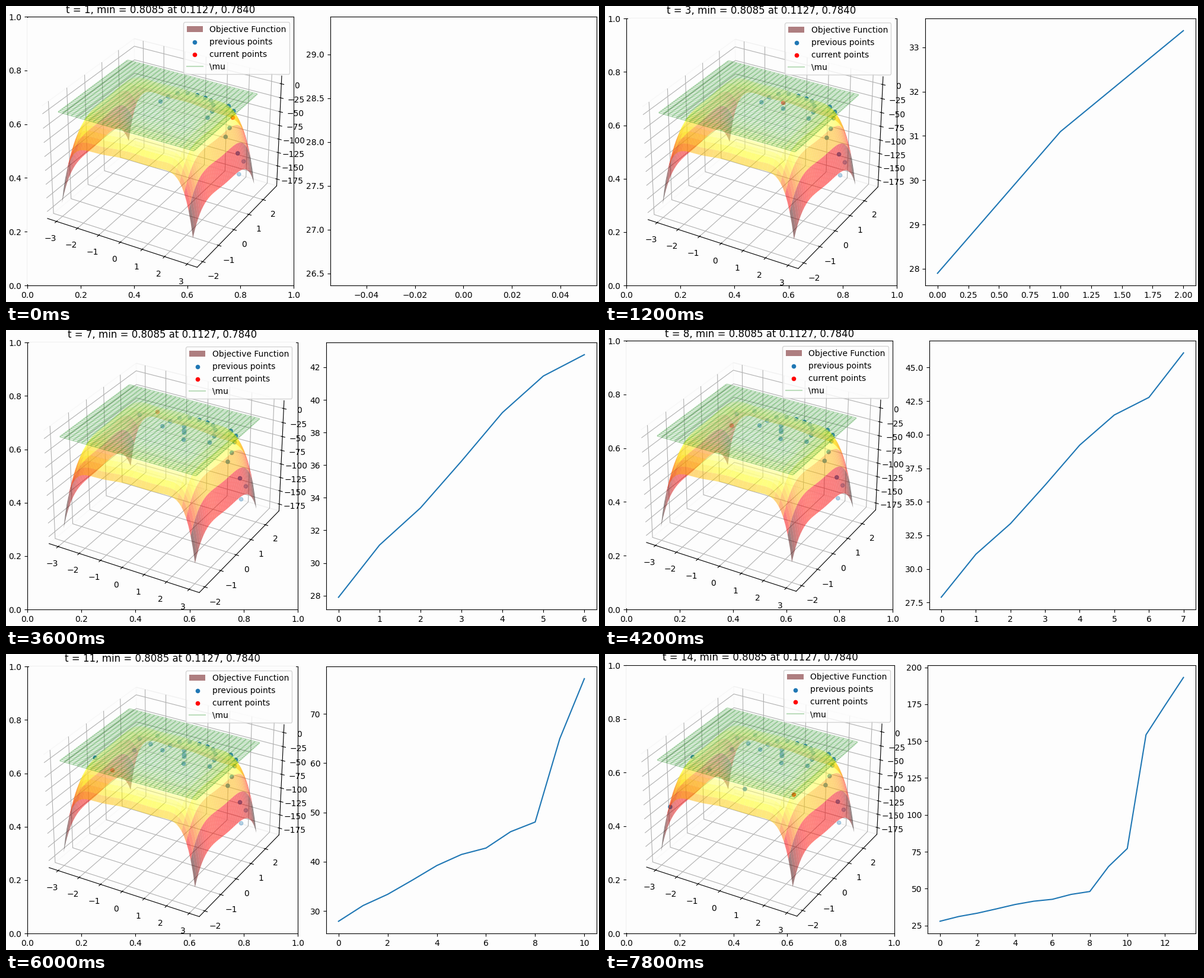
A matplotlib script that plays this animation: 1000x500 px, repeating every 8000 ms.

```python
import numpy as np
import matplotlib.pyplot as plt
from matplotlib.animation import FuncAnimation
from matplotlib.lines import Line2D
from matplotlib.patches import Patch

PAPER = "#fdfdfd"
plt.rcParams.update({"figure.facecolor": PAPER, "axes.facecolor": PAPER,
                     "savefig.facecolor": PAPER, "font.family": "DejaVu Sans"})

WIDTH, HEIGHT = 1000, 500
FRAMES_PER_STEP = 3
DIGIT_WIDTH = 8.84
BEST = 1.0316


def camel(x, y):
    """Negated six-hump camel function."""
    return -((4 - 2.1 * x**2 + x**4 / 3) * x**2 + x * y + 4 * (y**2 - 1) * y**2)


def on_surface(xy):
    x, y = np.asarray(xy).T
    return np.column_stack([x, y, camel(x, y)])


# First samples: an arch over the plateau and a few along the far rim
theta = np.linspace(0, np.pi, 10)
arch = np.column_stack([1.05 - 1.05 * np.cos(theta), 0.1 + 1.1 * np.sin(theta)])
rim = [(2.05, 1.53), (2.22, 1.62), (2.6, 0.8), (2.66, 0.46),
       (2.88, 0.97), (2.17, 2.5), (1.88, 2.645)]
initial = on_surface(np.vstack([arch, rim]))

# One point is queried per step; the curve is their cumulative regret
queries = on_surface([
    (2.471, 1.167), (0.935, 0.146), (0.72, 0.44), (1.21, -0.26), (0.865, 0.24),
    (-1.296, 0.43), (-0.79, 0.845), (-1.02, -0.25), (-0.68, 0.287),
    (-2.361, -0.83), (-1.136, -1.39), (-2.485, -2), (0.638, -1.643),
    (2.42, -1.212)])
regret = np.cumsum(BEST - queries[:, 2])


def place(ax, left, right, top, bottom=472):
    ax.set_position([left / WIDTH, 1 - bottom / HEIGHT,
                     (right - left) / WIDTH, (bottom - top) / HEIGHT])


def arrange():
    """Fit both panels to the widest y tick label of the chart."""
    labels = chart.yaxis.get_major_formatter().format_ticks(chart.get_yticks())
    chars = max(len(s) - 0.5 * ("." in s) for s in labels)
    extra = (chars - 2) * DIGIT_WIDTH
    inner, start, top = 492 - extra / 2, 540 + extra / 2, 21.2 - 0.24 * extra
    place(back, 36, inner, top)
    place(scene, 36, inner, top)
    place(chart, start, 996, top)


fig = plt.figure(figsize=(10, 5), dpi=100)
back = fig.add_subplot(1, 2, 1)
chart = fig.add_subplot(1, 2, 2)
scene = fig.add_axes([0, 0, 0.5, 1], projection="3d", computed_zorder=False)

X, Y = np.meshgrid(np.linspace(-3, 3, 61), np.linspace(-2, 2, 41))
scene.plot_surface(X, Y, camel(X, Y), cmap="hot", alpha=0.5, zorder=3)
scene.plot_wireframe(X, Y, np.zeros_like(X), color="g", alpha=0.25, zorder=4)
scene.set_xticks(range(-3, 4))
scene.set_yticks(range(-2, 3))
scene.set_zticks(range(-175, 1, 25))
scene.set_xlim(-3.4375, 3.4375)
scene.set_ylim(-2.338, 2.978)
scene.set_zlim(-187.84, 13.87)
for axis in (scene.xaxis, scene.yaxis, scene.zaxis):
    axis.pane.set_facecolor(PAPER)

scene.legend(
    [Patch(facecolor=(0.38, 0, 0.02), alpha=0.5, linewidth=0),
     back.scatter([], [], s=20, color="tab:blue"),
     back.scatter([], [], s=20, color="r"),
     Line2D([], [], color="g", alpha=0.25)],
    ["Objective Function", "previous points", "current points", r"\mu"],
    loc="upper right")
back.set_xlim(0, 1)
back.set_ylim(0, 1)

dots = []


def draw(frame):
    step = frame // FRAMES_PER_STEP + 1

    while dots:
        dots.pop().remove()
    previous = np.vstack([initial, queries[:step - 1]])
    dots.append(scene.scatter(*queries[step - 1], color="r", zorder=1,
                              depthshade=False))
    dots.append(scene.scatter(*previous.T, color="tab:blue", zorder=2))
    # 3D axes scale the title height by 0.92
    scene.set_title(f"t = {step}, min = 0.8085 at 0.1127, 0.7840", y=1 / 0.92)

    chart.clear()
    chart.plot(range(step), regret[:step])
    arrange()
    return []


animation = FuncAnimation(fig, draw, frames=40, interval=200,
                          init_func=lambda: draw(0), repeat=True, blit=False)
plt.show()
```
